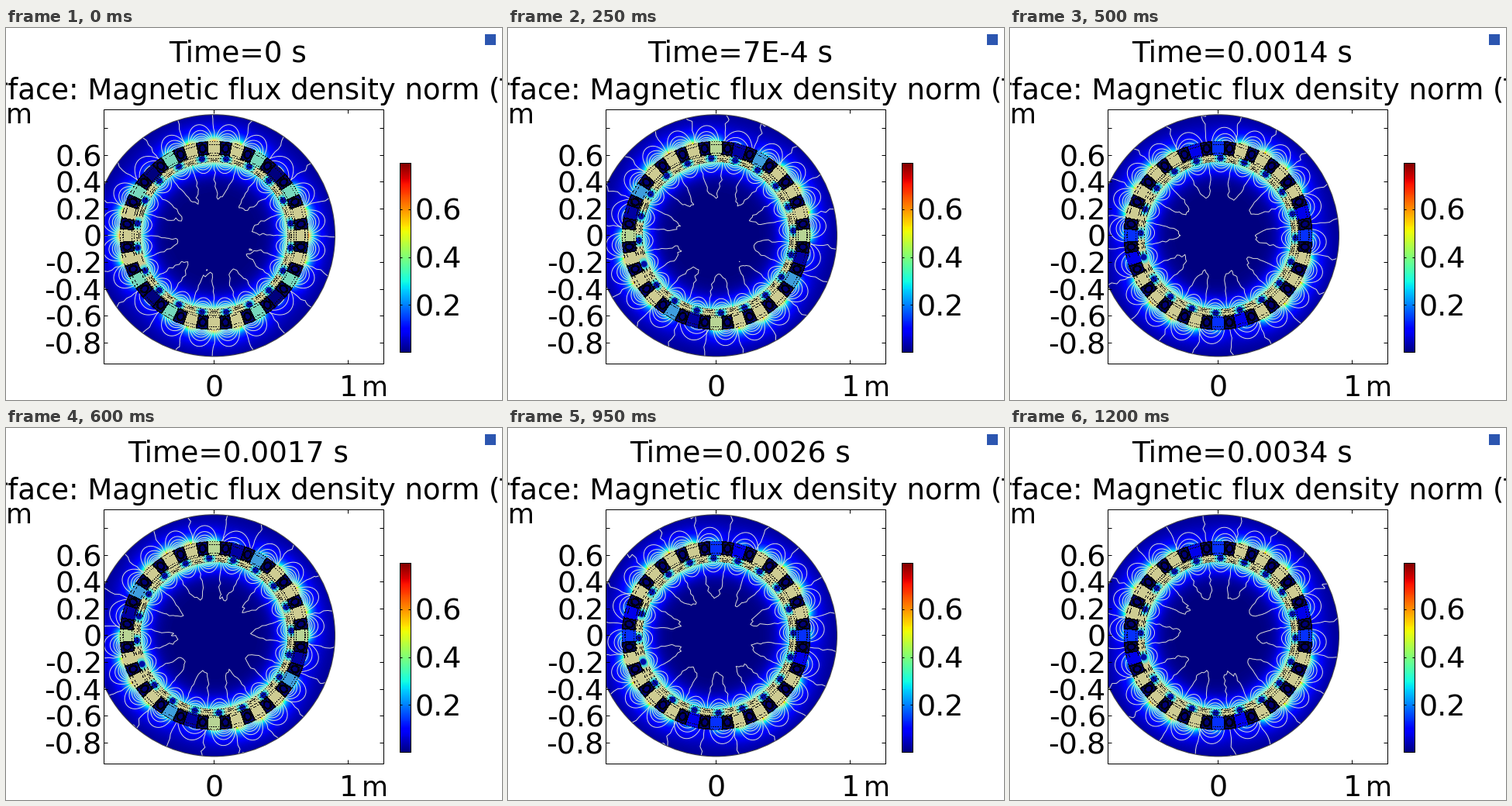
Write a matplotlib script that moves like this. It is 640 by 480 pixels and loops after 1250 ms.

```python
import numpy as np
import matplotlib as mpl
import matplotlib.pyplot as plt
from matplotlib.animation import FuncAnimation
from matplotlib.patches import Circle, Rectangle

W, H, DPI = 640, 480, 100
FRAMES, INTERVAL = 25, 50
CX, CY, UNIT = 268.5, 267.8, 173      # centre and pixels per metre
R_IN, R_GAP, R_OUT, R_EDGE = 95, 104, 122, 156
LEFT, RIGHT, TOP, BOTTOM = 126.5, 487.5, 105.5, 433.5
PIXEL = 72 / DPI                      # one pixel in points
JET = mpl.colormaps["jet"]
B_MAX = 0.797
TAN = np.array([206, 204, 146]) / 255
CYAN = np.array([0.25, 0.88, 0.88])
BLUE = np.array([0, 0.05, 0.66])
NAVY = np.array([0, 0, 0.46])
LINE = "#dadada"

fig = plt.figure(figsize=(W / DPI, H / DPI), dpi=DPI, facecolor="white")
ax = fig.add_axes([0, 0, 1, 1])
ax.set_xlim(0, W)
ax.set_ylim(H, 0)
ax.axis("off")


def label(x, y, text, px=38, ha="left"):
    return ax.text(x, y, text, fontsize=px * PIXEL, ha=ha, va="baseline",
                   family="DejaVu Sans", color="black")


def stroke(x, y):
    ax.plot(x, y, color="black", lw=PIXEL, zorder=6, snap=False,
            solid_capstyle="butt")


def outline(x0, y0, x1, y1):
    return ax.add_patch(Rectangle((x0, y0), x1 - x0, y1 - y0, fill=False,
                                  ec="black", lw=PIXEL, zorder=6, snap=False))


def draw_static():
    for k in range(-4, 5):
        y = np.floor(CY - k * 0.2 * UNIT) + 0.5
        stroke([LEFT, LEFT + 5], [y, y])
        stroke([RIGHT - 5, RIGHT], [y, y])
        if k < 4:
            label(123.8, y + 13.7, f"{k / 5:g}", ha="right")
    for k in (0, 1):
        x = np.floor(CX + k * UNIT) + 0.5
        stroke([x, x], [BOTTOM - 5, BOTTOM])
        stroke([x, x], [TOP, TOP + 5])
        label(x, 475, str(k), ha="center")
    label(-0.5, 123, "m", 35)
    label(459, 475, "m", 35)
    label(-60, 91.5, "Surface: Magnetic flux density norm (T)", 37)

    ramp = np.linspace(1, 0, 245)[:, None]
    ax.imshow(ramp, cmap=JET, extent=(508, 523, 419, 174),
              aspect="auto", interpolation="nearest")
    outline(508.5, 174.5, 522.5, 418.5)
    for k in (1, 2, 3):
        y = np.floor(419 - k * 61.4) + 0.5
        stroke([519.5, 522.5], [y, y])
        stroke([508.5, 511.5], [y, y])
        label(528, y + 13.5, f"{k / 5:g}")

    ax.add_patch(Rectangle((618, 8), 14, 14, color="#2c56b0", lw=0))


draw_static()
frame = outline(LEFT, TOP, RIGHT, BOTTOM)
rim = ax.add_patch(Circle((CX, CY), R_EDGE, fill=False, ec="#44444c", lw=0.8,
                          zorder=4))
rim.set_clip_path(frame)
title = label(299.3, 44, "", 37.4, "center")

# Pixel grid of the plot area in polar coordinates
px, py = np.meshgrid(np.arange(127, 487) + 0.5, np.arange(106, 433) + 0.5)
rad = np.hypot(px - CX, py - CY)
ang = np.arctan2(CY - py, px - CX)
inner = rad < R_IN
ring = (rad >= R_IN) & (rad < R_GAP)
teeth = (rad >= R_GAP) & (rad < R_OUT)

PITCH = np.pi / 12
tooth_ang = np.round(ang / PITCH) * PITCH
is_tooth = np.abs(ang - tooth_ang) < PITCH / 4

# Slot interior: coil outline on navy
slot_u = ((ang / PITCH) % 1 - 0.5) * 4
slot_v = (rad - R_GAP) / (R_OUT - R_GAP) * 2 - 1
coil = np.hypot(slot_u, slot_v)
slot_ink = ((np.abs(slot_u) > 0.72) | (np.abs(slot_v) > 0.8)
            | ((coil > 0.4) & (coil < 0.72)))
slot_rgb = np.where(slot_ink[..., None], [0, 0, 0.06], NAVY)

dots = np.floor(ang * rad / 1.5) % 2 == 0
dotted = np.zeros_like(dots)
for r0 in (121.3, 117.5, 106, 103.2, 99.5, 95.3):
    dotted |= (np.abs(rad - r0) < 0.55) & dots

picture = ax.imshow(np.ones(rad.shape + (3,)), extent=(127, 487, 433, 106),
                    aspect="auto", interpolation="nearest", zorder=2)


def mix(a, b, w):
    w = np.clip(w, 0, 1)[..., None]
    return a * (1 - w) + b * w


def surface(psi):
    """Colours of the flux density for electrical angle psi."""
    beat = np.exp(1j * (4 * ang + 2 * psi))
    rho_o = np.maximum(rad / R_OUT, 1)
    rho_i = np.minimum(rad / R_IN, 1)
    b_out = np.abs(0.27 + 0.15 * beat * rho_o ** -4) * rho_o ** -10
    b_out *= 1 + 0.5 * np.cos(24 * ang) * rho_o ** -20
    b_in = np.abs(0.36 + 0.06 * beat * rho_i ** 4) * rho_i ** 9
    rgb = JET(np.where(inner, b_in, b_out) / B_MAX)[..., :3]

    flux = np.abs(np.cos(2 * tooth_ang + psi))
    tooth = mix(JET(flux ** 1.5)[..., :3], TAN, (flux - 0.3) / 0.35)
    rgb = np.where((teeth & is_tooth)[..., None], tooth, rgb)
    rgb = np.where((teeth & ~is_tooth)[..., None], slot_rgb, rgb)

    # Magnet ring: dark spots where the radial field changes sign
    off = ((10 * ang - psi) / np.pi) % 1 - 0.5
    spot = np.hypot(off * np.pi / 10 * rad, rad - 100)
    band = mix(CYAN, TAN, (spot - 5.5) / 4)
    band = mix(BLUE, band, (spot - 3.2) / 2)
    rgb = np.where(ring[..., None], band, rgb)
    pole = (np.abs(off) > 0.36) & (np.abs(rad - 97.3) < 0.5)
    rgb[dotted | pole] = [0.04, 0.04, 0.06]
    rgb[rad > R_EDGE] = 1
    return rgb


def polar_mesh(radii, count):
    th, r = np.meshgrid(np.linspace(0, 2 * np.pi, count), radii)
    return th, r, CX + r * np.cos(th), CY - r * np.sin(th)


OUT = polar_mesh(np.linspace(R_OUT, R_EDGE, 26), 601)
INN = polar_mesh(np.linspace(68, R_IN, 20), 481)
RIM = polar_mesh(np.linspace(R_OUT, R_EDGE, 7), 181)
CORE = polar_mesh(np.linspace(36, R_IN, 14), 121)
steps = np.arange(0.22, 1.4, 0.17)
LEVELS = np.concatenate([-steps[::-1], steps])
lines = []


def isolines(mesh, field, levels):
    cs = ax.contour(mesh[2], mesh[3], field, levels=levels, colors=LINE,
                    linewidths=PIXEL, linestyles="solid", zorder=3)
    cs.set_clip_path(frame)
    lines.append(cs)


def jitter(rng, shape):
    u = rng.uniform(-1, 1, shape)
    u[:, -1] = u[:, 0]
    return u


def potential(th, rho, psi, slot):
    return (rho ** 10 * np.sin(10 * th - psi)
            + slot * rho ** 14 * np.sin(14 * th + psi))


def draw(i):
    n = 34 * i // 24                   # time in units of 1E-4 s
    psi = np.radians(18 * n)
    if n == 0:
        stamp = "0"
    else:
        stamp = f"{n}E-4" if n < 10 else f"{n / 1e4:g}"
    title.set_text(f"Time={stamp} s")
    picture.set_data(np.clip(surface(psi), 0, 1))

    while lines:
        lines.pop().remove()
    isolines(OUT, potential(OUT[0], R_OUT / OUT[1], psi, 0.42), LEVELS)
    isolines(INN, potential(INN[0], INN[1] / R_IN, psi, 0.12), LEVELS)

    # Zero lines wander where the field is weak
    rng = np.random.default_rng(n + 3)
    th, r = RIM[:2]
    sway = 0.3 * jitter(rng, th.shape) * (r / R_OUT - 1) / 0.28
    isolines(RIM, np.sin(10 * th - psi + sway), [0])
    th, r = CORE[:2]
    rho = r / R_IN
    sway = 0.9 * jitter(rng, th.shape) * (1 - rho)
    floor = 0.0194 * (1 + 0.45 * jitter(rng, th.shape))
    isolines(CORE, np.sin(10 * th - psi + sway) * rho ** 6 / floor, [1])
    return [picture, title]


anim = FuncAnimation(fig, draw, frames=FRAMES, interval=INTERVAL,
                     init_func=lambda: draw(0), repeat=True, repeat_delay=0,
                     blit=False)
plt.show()
```
